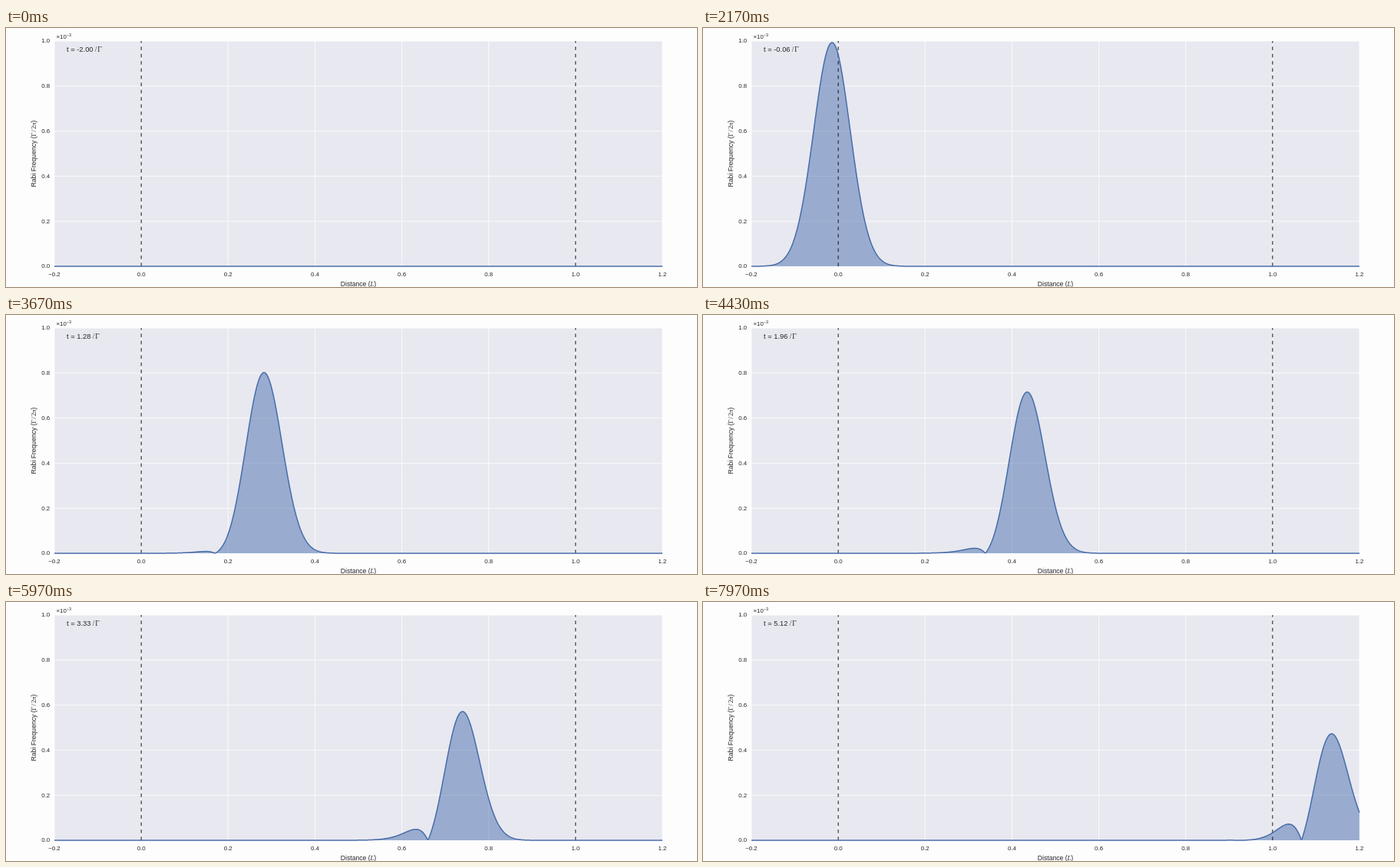
An HTML page that plays this animation: 900 px wide and 338 px high, repeating every 8 s.

```html
<!DOCTYPE html>
<html lang="en">
<head>
<meta charset="utf-8">
<title>Pulse through an absorbing medium</title>
<style>
  html, body { margin: 0; width: 100%; height: 100%; overflow: hidden; background: #fdfdfe; }
  svg { display: block; width: 900px; height: 338px; }
  text { font: 7.85px "Liberation Sans", Arial, sans-serif; fill: #262626; }
  .label { font-size: 8.6px; }
  .clock { font-size: 9.36px; }
  .math { font-family: "Liberation Serif", serif; }
  .grid { stroke: #fff; stroke-width: .8; fill: none; }
  .edge { stroke: #111; stroke-width: 1; stroke-dasharray: 4.7 4.7; fill: none; }
</style>
</head>
<body>
<svg viewBox="0 0 900 338">
  <rect x="63" y="17" width="792" height="294" fill="#e8e8f0"/>
  <path id="grid" class="grid"/>
  <path id="fill" fill="#4c72b0" fill-opacity=".5"/>
  <path id="edges" class="edge"/>
  <path id="curve" fill="none" stroke="#476ca9" stroke-width="1.5" stroke-linejoin="round"/>
  <g id="ticks"></g>
  <text x="65.5" y="14.2">×10<tspan dy="-2.8" font-size="5.4">−3</tspan></text>
  <text class="label" x="459" y="336.5" text-anchor="middle">Distance (<tspan class="math" font-style="italic">L</tspan>)</text>
  <text class="label" text-anchor="middle" transform="translate(38.6 164) rotate(-90)">Rabi Frequency (<tspan class="math">Γ<tspan dx="1">/</tspan><tspan dx="1">2</tspan><tspan font-style="italic">π</tspan></tspan>)</text>
  <text class="clock" x="79" y="31.4">t = <tspan id="time"></tspan><tspan class="math" dx="2.2">/</tspan><tspan class="math" dx="1">Γ</tspan></text>
</svg>
<script>
const $ = id => document.getElementById(id);
const LEFT = 63, RIGHT = 855, BASE = 311, UNIT = 792 / 1.4, HEIGHT = 294;
const px = x => LEFT + (x + 0.2) * UNIT;
const py = y => BASE - y * HEIGHT;

// Pulse and medium, with times in units of 1/Γ
const SPEED = 0.2193, SIGMA = 0.1935, PEAK = 0.993;
const COUPLING = 6.92, DECAY = 6.7;
const LOOP = 8000, TIME_STEP = 12 / 403;
const DU = 0.0125, SAMPLES = 120;

const gauss = s => Math.exp(-s * s / (2 * SIGMA * SIGMA));

// sqrt(q/u) J1(2 sqrt(qu)) as a power series
function response(q, u) {
  let term = q, sum = q;
  for (let k = 1; k < 18; k++) sum += term *= -q * u / (k * (k + 1));
  return sum * Math.exp(-DECAY * u);
}

// The incoming pulse minus the delayed field radiated by the medium
function field(x, t) {
  const s = t - x / SPEED;
  if (s < -1.2 || s > 2.3) return 0;
  let e = gauss(s);
  const q = COUPLING * Math.min(Math.max(x, 0), 1);
  if (q > 0) {
    for (let i = 0; i < SAMPLES; i++) {
      const u = (i + 0.5) * DU;
      if (Math.abs(s - u) < 5 * SIGMA) e -= DU * response(q, u) * gauss(s - u);
    }
  }
  return PEAK * Math.abs(e);
}

function drawAxes() {
  let grid = "", ticks = "";
  const tick = (x, y, anchor, value) =>
    ticks += `<text x="${x}" y="${y}" text-anchor="${anchor}">${value.toFixed(1).replace("-", "−")}</text>`;
  for (let i = -1; i <= 6; i++) {
    const x = px(i / 5);
    grid += `M${x} 17V${BASE}`;
    tick(x, 323.6, "middle", i / 5);
  }
  for (let i = 0; i <= 5; i++) {
    const y = py(i / 5);
    grid += `M${LEFT} ${y}H${RIGHT}`;
    tick(57.2, y + 2.4, "end", i / 5);
  }
  $("grid").setAttribute("d", grid);
  $("ticks").innerHTML = ticks;
  $("edges").setAttribute("d", [0, 1].map(x => `M${px(x)} ${BASE}V17`).join(""));
}

function drawPulse(t) {
  const points = [];
  for (let x = LEFT; x <= RIGHT; x++) {
    points.push(x + " " + py(field((x - LEFT) / UNIT - 0.2, t)).toFixed(2));
  }
  const line = points.join("L");
  $("curve").setAttribute("d", "M" + line);
  $("fill").setAttribute("d", `M${LEFT} ${BASE}L${line}L${RIGHT} ${BASE}Z`);
  $("time").textContent = t.toFixed(2);
}

// Thirty steps a second, rounded to hundredths: 0, 30, 70, 100 ms ...
function stepAt(ms) {
  const rest = ms % 100;
  return Math.floor(ms / 100) * 3 + (rest >= 30) + (rest >= 70);
}

let shown = -1;
function animate() {
  const step = stepAt(performance.now() % LOOP);
  if (step !== shown) drawPulse(-2 + step * TIME_STEP);
  shown = step;
  requestAnimationFrame(animate);
}

drawAxes();
animate();
</script>
</body>
</html>
```
